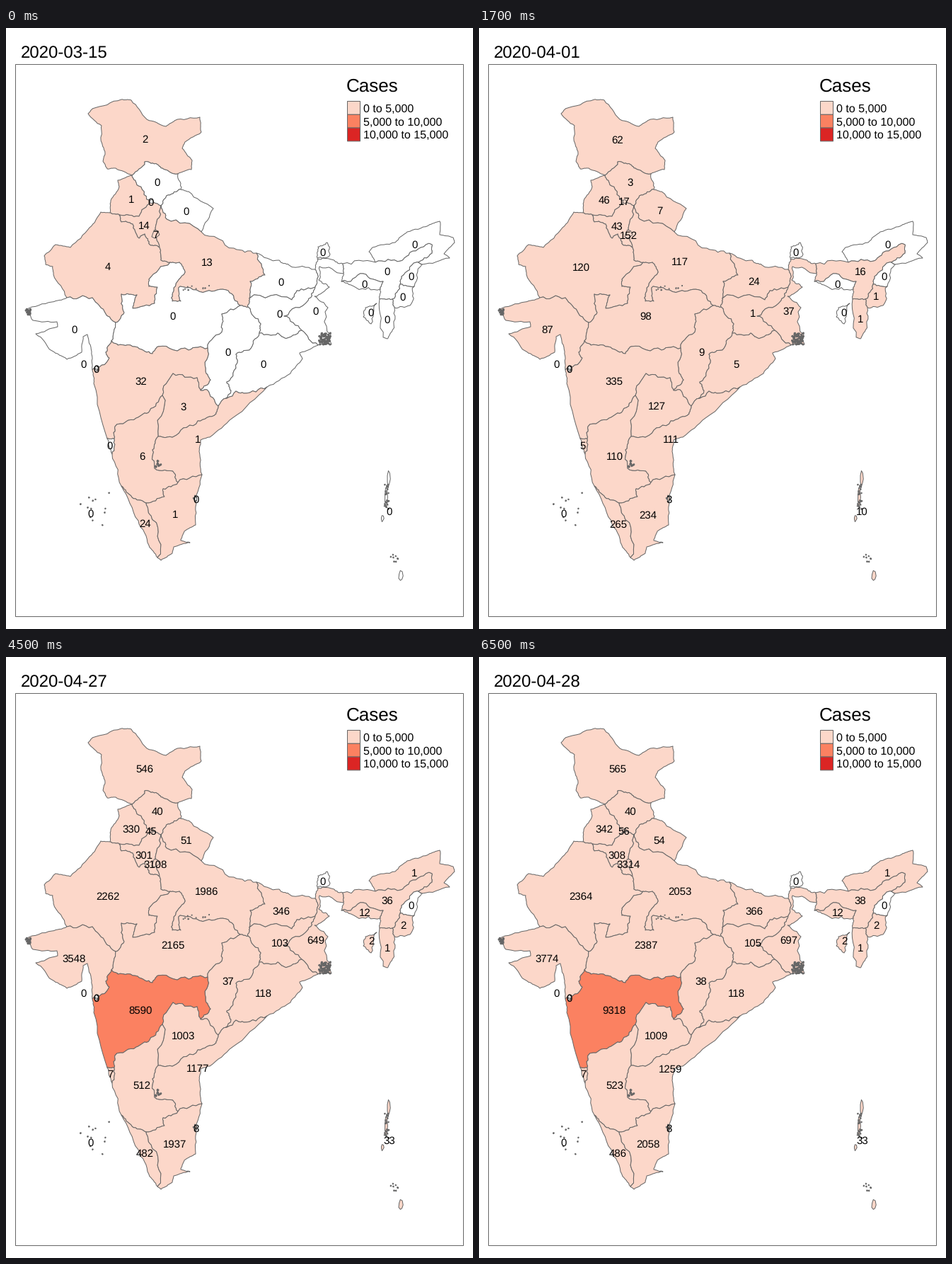
A matplotlib script that plays this animation: 660x849 px, repeating every 8 s.

```python
import numpy as np
import matplotlib.pyplot as plt
from matplotlib.animation import FuncAnimation
from matplotlib.patches import Polygon, Rectangle

W, H, DPI = 660, 849, 64
PT = 72 / DPI
GREY = "#666666"
SHADES = ["#FCD7C9", "#FB8161", "#DB2524"]
DATES = ["2020-03-15", "2020-04-01", "2020-04-15", "2020-04-27", "2020-04-28"]
STARTS = [1, 5, 9, 13]  # in half seconds

rng = np.random.default_rng(7)
plt.rcParams.update({"font.family": "Liberation Sans", "text.hinting": "none",
                     "text.hinting_factor": 1})
fig = plt.figure(figsize=(W / DPI, H / DPI), dpi=DPI, facecolor="white")
ax = fig.add_axes([0, 0, 1, 1])
ax.set(xlim=(0, W), ylim=(H, 0))
ax.axis("off")


def edge(*xy, rough=1.0):
    """Key points joined by a fractal line that is roughest at small scale."""
    p = np.reshape(xy, (-1, 2)).astype(float)
    for amount in (0.09, 0.15, 0.24):
        d = np.diff(p, axis=0)
        normal = np.column_stack([-d[:, 1], d[:, 0]])
        shift = rough * amount * rng.uniform(-1, 1, (len(d), 1))
        q = np.empty((2 * len(p) - 1, 2))
        q[::2] = p
        q[1::2] = p[:-1] + d / 2 + normal * shift
        p = q
    return p


def coast(*xy):
    return edge(*xy, rough=0.5)


def blob(x, y, rx, ry, n=7):
    a = 2 * np.pi * np.arange(n) / n
    r = rng.uniform(0.7, 1.2, n)
    return np.column_stack([x + rx * r * np.cos(a), y + ry * r * np.sin(a)])


def gap(a, b):
    return np.hypot(*(a - b))


def ring(*edges):
    """Chain edges end to end, turning each one as needed."""
    path = edges[0]
    ends = edges[1][[0, -1]]
    if min(gap(path[0], e) for e in ends) < min(gap(path[-1], e) for e in ends):
        path = path[::-1]
    for e in edges[1:]:
        if gap(path[-1], e[-1]) < gap(path[-1], e[0]):
            e = e[::-1]
        path = np.vstack([path, e])
    return path


def text(x, y, s, size, **kw):
    return ax.text(x, y, s, fontsize=size * PT, va="baseline", **kw)


def shape(points, face="white", z=1):
    return ax.add_patch(Polygon(points, closed=True, fc=face, ec=GREY, lw=PT,
                                joinstyle="round", zorder=z))


def box(x, y, w, h, face="none"):
    ax.add_patch(Rectangle((x, y), w, h, fc=face, ec=GREY, lw=PT, snap=False))


def speckle(x0, y0, x1, y1, n, r=0.9):
    for _ in range(n):
        shape(blob(rng.uniform(x0, x1), rng.uniform(y0, y1), r, r), GREY, 2)


regions = []


def region(x, y, counts, *outlines):
    patches = [shape(points) for points in outlines]
    label = text(x, y + 5.4, "", 15.4, ha="center", zorder=5)
    regions.append((counts, patches, label))


NONE = [0] * len(DATES)

# North
jk_out = coast(178, 208, 155, 198, 143, 199, 137, 188, 140, 177, 134, 157, 135, 138, 116, 121,
               122, 114, 163, 101, 177, 102, 199, 129, 226, 139, 238, 131, 274, 126, 276, 147,
               253, 161, 249, 170, 263, 187, 262, 200, 243, 206)
jk_hp = edge(178, 208, 196, 189, 214, 193, 222, 199, 243, 206)
hp_out = edge(243, 206, 247, 228)
hp_pb = edge(178, 208, 187, 223, 205, 246)
hp_hr = edge(205, 246, 219, 251)
hp_uk = edge(219, 251, 229, 236, 247, 228)
pb_out = coast(178, 208, 158, 215, 160, 224, 148, 244, 147, 261)
pb_rj = edge(147, 261, 160, 264)
pb_hr = edge(160, 264, 188, 266, 205, 246)
rj_hr = edge(160, 264, 163, 274, 179, 277, 188, 297, 196, 291, 203, 306, 217, 310)
hr_up = edge(219, 251, 211, 283, 217, 310)
uk_out = coast(247, 228, 258, 231, 293, 255, 276, 288)
uk_up = edge(219, 251, 227, 270, 276, 288)
region(196, 157, (2, 62, 300, 546, 565), ring(jk_out, jk_hp))
region(214, 217, (0, 3, 35, 40, 40), ring(jk_hp, hp_out, hp_uk, hp_hr, hp_pb))
region(177, 242, (1, 46, 186, 330, 342), ring(pb_out, pb_rj, pb_hr, hp_pb))
region(255, 258, (0, 7, 37, 51, 54), ring(hp_uk, uk_out, uk_up))
region(195, 279, (14, 43, 204, 301, 308), ring(pb_hr, hp_hr, hr_up, rj_hr))

# West and centre
rj_out = coast(147, 261, 134, 260, 118, 282, 91, 310, 70, 306, 54, 322, 56, 334, 66, 337,
               67, 348, 86, 381)
rj_gj = edge(86, 381, 122, 381, 141, 404, 155, 416)
rj_mp = edge(155, 416, 167, 402, 163, 376, 185, 377, 179, 396, 210, 389, 214, 366, 202, 365,
             202, 355, 232, 331)
rj_up = edge(217, 310, 219, 328, 232, 331)
up_mp = edge(232, 331, 245, 331, 253, 345, 237, 367, 235, 386, 247, 386, 246, 365, 283, 372,
             314, 371, 331, 392)
up_cg = edge(331, 392, 342, 394)
up_jh = edge(342, 394, 344, 382)
up_br = edge(344, 382, 345, 358, 366, 349, 354, 318)
up_out = edge(276, 288, 322, 311, 354, 318)
gj_out = coast(86, 381, 65, 387, 28, 398, 38, 413, 72, 415, 73, 422, 42, 432, 65, 456, 86, 468,
               107, 458, 109, 436, 115, 433, 121, 457, 122, 483)
gj_mp = edge(155, 416, 149, 442)
gj_mh = edge(149, 442, 141, 458, 146, 466, 122, 483)
mp_mh = edge(149, 442, 158, 448, 186, 451, 207, 460, 215, 450, 258, 455, 285, 452)
mp_cg = edge(331, 392, 305, 404, 306, 425, 285, 452)
region(144, 337, (4, 120, 1076, 2262, 2364), ring(rj_out, rj_gj, rj_mp, rj_up, rj_hr, pb_rj))
region(96.5, 425, (0, 87, 766, 3548, 3774), ring(gj_out, gj_mh, gj_mp, rj_gj))
region(284, 330, (13, 117, 735, 1986, 2053),
       ring(uk_up, up_out, up_br, up_jh, up_cg, up_mp, rj_up, hr_up))
region(236, 406, (0, 98, 938, 2165, 2387), ring(rj_mp, up_mp, mp_cg, mp_mh, gj_mp))

# East
br_out = edge(354, 318, 386, 328, 400, 335, 437, 341)
br_wb = edge(437, 341, 441, 352, 437, 366)
br_jh = edge(344, 382, 404, 384, 411, 371, 437, 366)
jh_wb = edge(437, 366, 427, 385, 393, 407, 418, 427)
jh_od = edge(418, 427, 392, 437, 384, 431, 358, 431)
jh_cg = edge(342, 394, 360, 418, 358, 431)
wb_od = edge(418, 427, 441, 448)
wb_out = edge(437, 341, 440, 326, 460, 327, 476, 333)
wb_as = edge(476, 333, 477, 347)
wb_bd = edge(477, 347, 443, 337, 442, 356, 457, 366, 436, 379, 455, 395, 460, 447, 441, 448)
cg_od = edge(358, 431, 344, 455, 325, 461, 327, 473, 312, 500, 318, 512, 300, 534)
cg_mh = edge(285, 452, 282, 485, 289, 497, 275, 512)
cg_tg = edge(275, 512, 284, 511, 300, 534)
od_ap = edge(300, 534, 325, 513, 336, 516, 369, 507)
od_out = coast(441, 448, 415, 459, 419, 467, 402, 488, 369, 507)
region(389, 358, (0, 24, 72, 346, 366), ring(br_out, br_wb, br_jh, up_br))
region(387, 403, (0, 1, 28, 103, 105), ring(br_jh, jh_wb, jh_od, jh_cg, up_jh))
region(438, 399, (0, 37, 213, 649, 697), ring(wb_out, wb_as, wb_bd, wb_od, jh_wb, br_wb))
region(314, 457, (0, 9, 33, 37, 38), ring(mp_cg, up_cg, jh_cg, cg_od, cg_tg, cg_mh))
region(364, 474, (0, 5, 60, 118, 118), ring(jh_od, wb_od, od_out, od_ap, cg_od))

# South
mh_out = coast(122, 483, 124, 502, 143, 580)
mh_ga = edge(143, 580, 153, 580)
mh_ka = edge(153, 580, 154, 563, 184, 551, 203, 541, 221, 519)
mh_tg = edge(221, 519, 236, 488, 270, 494, 275, 512)
ga_out = coast(143, 580, 150, 602)
ga_ka = edge(150, 602, 153, 580)
ka_out = coast(150, 602, 163, 647)
ka_tg = edge(221, 519, 215, 577)
ka_ap = edge(215, 577, 207, 596, 210, 622, 238, 629, 243, 642)
ka_tn = edge(243, 642, 222, 651, 224, 662, 198, 671)
ka_kl = edge(163, 647, 178, 663, 198, 671)
tg_ap = edge(215, 577, 241, 575, 271, 555, 297, 545, 300, 534)
ap_out = coast(369, 507, 320, 551, 288, 578, 275, 582, 273, 598, 277, 631)
ap_tn = edge(243, 642, 277, 631)
kl_out = coast(163, 647, 187, 696, 202, 731, 214, 748)
kl_tn = edge(198, 671, 206, 692, 213, 700, 214, 748)
tn_out = coast(277, 631, 268, 668, 268, 702, 252, 711, 247, 724, 260, 727, 237, 733, 235, 742,
               219, 752, 214, 748)
region(190.5, 498, (32, 335, 2916, 8590, 9318),
       ring(mh_out, mh_ga, mh_ka, mh_tg, cg_mh, mp_mh, gj_mh))
region(251, 534, (3, 127, 650, 1003, 1009), ring(mh_tg, cg_tg, tg_ap, ka_tg))
region(147, 589, (0, 5, 7, 7, 7), ring(mh_ga, ga_ka, ga_out))
region(192, 604, (6, 110, 279, 512, 523),
       ring(mh_ka, ka_tg, ka_ap, ka_tn, ka_kl, ka_out, ga_ka))
region(271, 581, (1, 111, 525, 1177, 1259), ring(tg_ap, od_ap, ap_out, ap_tn, ka_ap))
region(196.5, 700, (24, 265, 388, 482, 486), ring(ka_kl, kl_tn, kl_out))
region(239, 687, (1, 234, 1242, 1937, 2058), ring(ka_tn, ap_tn, tn_out, kl_tn))

# North-east
as_out = edge(476, 333, 522, 331)
as_ar = edge(522, 331, 558, 329, 571, 317, 602, 306, 602, 318, 580, 331)
as_nl = edge(580, 331, 559, 351, 557, 362)
as_mn = edge(557, 362, 546, 383)
as_mz = edge(546, 383, 528, 383)
as_bd = edge(528, 383, 529, 369)
as_ml = edge(529, 369, 533, 358, 505, 347, 474, 358)
as_w = edge(474, 358, 477, 347)
ml_out = edge(474, 358, 495, 367, 529, 369)
ar_out = coast(522, 331, 513, 316, 518, 310, 550, 303, 567, 288, 597, 279, 613, 273, 613, 292,
               632, 296, 634, 303, 619, 319, 627, 325, 588, 334)
nl_ar = edge(580, 331, 588, 334)
nl_out = edge(588, 334, 577, 365)
nl_mn = edge(557, 362, 577, 365)
mn_out = edge(577, 365, 571, 392, 549, 395)
mn_mz = edge(546, 383, 549, 395)
mz_out = edge(549, 395, 546, 427, 539, 439, 533, 437, 528, 383)
region(448, 316, NONE, edge(440, 325, 441, 309, 454, 303, 457, 322, 440, 325))
region(577.5, 305, (0, 0, 1, 1, 1), ring(as_ar, ar_out, nl_ar))
region(539, 343, (0, 16, 33, 36, 38),
       ring(as_out, as_ar, as_nl, as_mn, as_mz, as_bd, as_ml, as_w, wb_as))
region(507, 361, (0, 0, 7, 12, 12), ring(as_ml, ml_out))
region(573, 350, NONE, ring(as_nl, nl_ar, nl_out, nl_mn))
region(561, 379, (0, 1, 2, 2, 2), ring(as_mn, nl_mn, mn_out, mn_mz))
region(539, 411, (0, 1, 1, 1, 1), ring(as_mz, mn_mz, mz_out))
region(516, 401, (0, 0, 2, 2, 2), edge(505, 408, 508, 395, 524, 389, 516, 418, 505, 408))

# City territories and islands
region(211.5, 292, (7, 152, 1578, 3108, 3314), blob(211, 292, 5, 6))
region(205, 245, (0, 17, 21, 45, 56), blob(206, 245, 3, 3))
region(110, 474, NONE)
region(128, 481, NONE, blob(128, 481, 3, 4))
region(269, 665, (0, 3, 7, 8, 8), blob(268, 665, 2, 4))
region(120, 685, NONE)
region(541.5, 682, (0, 10, 11, 33, 33), blob(541, 637, 2, 10), blob(537, 663, 2, 15),
       blob(532, 693, 2, 4), blob(558, 774, 3, 7))

speckle(442, 431, 459, 447, 70, 1.2)  # river delta
speckle(28, 397, 35, 405, 22, 1.2)
speckle(535, 645, 541, 680, 24)
speckle(543, 741, 554, 754, 8)
speckle(210, 611, 219, 621, 9, 1.3)
speckle(265, 661, 270, 669, 6)
speckle(247, 364, 290, 371, 12, 0.6)
speckle(125, 477, 130, 484, 5)
speckle(100, 655, 148, 705, 12)

# Frame, legend and title
box(13.5, 51.5, 633, 780)
text(480.5, 90, "Cases", 26)
names = ["0 to 5,000", "5,000 to 10,000", "10,000 to 15,000"]
for i, (shade, name) in enumerate(zip(SHADES, names)):
    box(482.5, 103.5 + 18.8 * i, 18, 18.8, shade)
    text(505, 118.8 + 18.8 * i, name, 15.5)
title = text(20.5, 42.7, "", 23.8)


def update(frame):
    step = sum(frame >= s for s in STARTS)
    title.set_text(DATES[step])
    for counts, patches, label in regions:
        n = counts[step]
        label.set_text(str(n))
        for patch in patches:
            patch.set_facecolor(SHADES[n // 5000] if n else "white")


anim = FuncAnimation(fig, update, frames=16, interval=500, repeat=True, repeat_delay=0)
plt.show()
```
